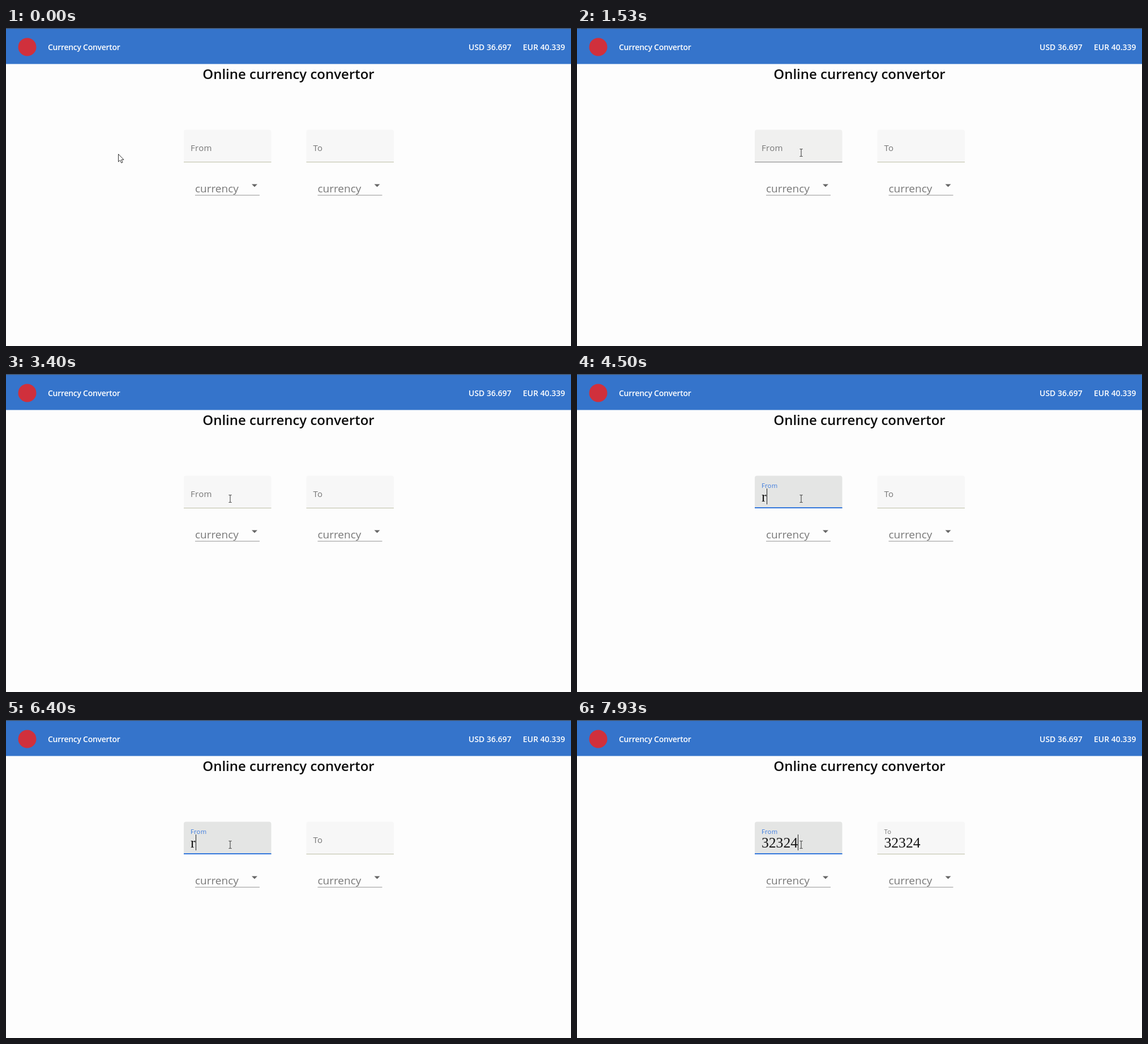
These frames come from a looping animation (998x561 px, 8000 ms). An HTML page:

```html
<!DOCTYPE html>
<html lang="en">
<head>
<meta charset="utf-8">
<title>Currency Convertor</title>
<style>
  html, body { margin: 0; width: 100%; height: 100%; overflow: hidden; background: #fdfdfd; }
  svg { display: block; width: 998px; height: 561px; }
  text { font-family: "Open Sans", "Noto Sans", sans-serif; white-space: pre; }
  .bar { font-size: 14px; font-weight: 600; fill: #fff; }
  .brand { letter-spacing: -0.28px; }
  .title { font-size: 24px; font-weight: 600; fill: #0b0b0b; text-anchor: middle; }
  .label { font-size: 15px; letter-spacing: 0.3px; }
  .value { font: 25.6px "Liberation Serif", "Times New Roman", serif; fill: #141414; }
  .select { font-size: 19px; fill: #787878; }
</style>
</head>
<body>
<svg viewBox="0 0 998 561" xmlns="http://www.w3.org/2000/svg">
  <rect width="998" height="561" fill="#fdfdfd"/>
  <rect width="998" height="63.5" fill="#3574cb"/>
  <rect width="998" height="1.3" fill="#48505a"/>
  <circle cx="37.5" cy="33.5" r="16" fill="#d0303c"/>
  <text class="bar brand" x="74" y="39">Currency Convertor</text>
  <text class="bar" x="817" y="39">USD 36.697</text>
  <text class="bar" x="913" y="39">EUR 40.339</text>
  <text class="title" x="499" y="90">Online currency convertor</text>
  <g id="fields"></g>
  <rect id="caret" y="202" width="1" height="28" fill="#222"/>
  <g id="pointer">
    <path id="arrow" d="M.5 .5V14L3.6 11.1 5.8 16 8 15 5.9 10.3H10Z" fill="#fff" stroke="#333" stroke-width="1"/>
    <path id="beam" d="M-2.5-6.5H-.8L0-6 .8-6.5H2.5M0-6V6M-2.5 6.5H-.8L0 6 .8 6.5H2.5" fill="none" stroke="#333" stroke-width="1"/>
  </g>
</svg>
<script>
const LOOP = 8000;
const BLINK = 530;
const HOVER_OFF = 2250;
const FOCUS = 3500;
const TO_FLOAT = 6985;

// [time, content of the From input]
const typing = [
  [FOCUS, ''], [4350, 'r'], [4900, 'rr'], [6250, 'r'], [6450, ''],
  [7060, '3'], [7200, '32'], [7340, '323'], [7480, '3232'], [7620, '32324']
];
const pointerPath = { start: 400, end: 1250, from: [198, 222], to: [396, 220] };

const $ = id => document.getElementById(id);
const set = (el, attrs) => {
  for (const name in attrs) el.setAttribute(name, attrs[name]);
};
const clamp = x => Math.min(1, Math.max(0, x));
const lerp = (a, b, p) => a + (b - a) * p;
const mix = (a, b, p) => `rgb(${a.map((v, i) => Math.round(lerp(v, b[i], p)))})`;
const smooth = p => p * p * (3 - 2 * p);

// cubic-bezier(.4, 0, .2, 1)
function standardEase(x) {
  if (x <= 0 || x >= 1) return clamp(x);
  let lo = 0, hi = 1, u;
  for (let i = 0; i < 20; i++) {
    u = (lo + hi) / 2;
    const bx = 1.2 * u * (1 - u) ** 2 + 0.6 * u * u * (1 - u) + u ** 3;
    if (bx < x) lo = u; else hi = u;
  }
  return u * u * (3 - 2 * u);
}
const progress = (t, start, length) => standardEase((t - start) / length);

function makeField(x, name) {
  const group = document.createElementNS('http://www.w3.org/2000/svg', 'g');
  group.setAttribute('transform', `translate(${x} 0)`);
  group.innerHTML = `
    <path class="box" d="M0 237V183.500a4 4 0 0 1 4-4H150.500a4 4 0 0 1 4 4V237Z" fill="#f7f7f7"/>
    <rect class="line" y="236" width="154.500" height="1" fill="#bdbea4"/>
    <rect class="ripple" y="235" height="2" fill="#3478dc"/>
    <text class="label" fill="#777">${name}</text>
    <text class="value" x="12" y="224.500"></text>
    <text class="select" x="20" y="290">currency</text>
    <rect x="20" y="294.500" width="114" height="1" fill="#929292"/>
    <path d="M120 275.500h10l-5 5Z" fill="#666"/>`;
  $('fields').append(group);
  const part = {};
  for (const key of ['box', 'line', 'ripple', 'label', 'value']) {
    part[key] = group.querySelector('.' + key);
  }
  return part;
}

const fromField = makeField(314, 'From');
const toField = makeField(530.5, 'To');

function floatLabel(field, p) {
  set(field.label, {
    transform: `translate(12 ${lerp(217, 201, p)}) scale(${lerp(1, 0.75, p)})`
  });
}

function drawPointer(t) {
  const { start, end, from, to } = pointerPath;
  const p = smooth(clamp((t - start) / (end - start)));
  const x = lerp(from[0], to[0], p), y = lerp(from[1], to[1], p);
  const inside = x > 314;
  set($('pointer'), { transform: `translate(${x} ${y})` });
  set($('arrow'), { visibility: inside ? 'hidden' : 'visible' });
  set($('beam'), { visibility: inside ? 'visible' : 'hidden' });
  return inside;
}

function draw(t) {
  const inside = drawPointer(t);
  const hover = inside && t < HOVER_OFF;
  const focus = progress(t, FOCUS, 150);
  const ripple = progress(t, FOCUS, 180);

  set(fromField.box, { fill: mix(hover ? [240, 240, 239] : [247, 247, 247], [228, 229, 228], clamp((t - FOCUS) / 15)) });
  set(fromField.line, { fill: hover ? '#808080' : '#bdbea4' });
  set(fromField.ripple, { x: 77.25 * (1 - ripple), width: 154.5 * ripple });
  set(fromField.label, { fill: mix([119, 119, 119], [58, 121, 222], focus) });
  floatLabel(fromField, focus);
  floatLabel(toField, progress(t, TO_FLOAT, 150));

  const last = typing.filter(([time]) => time <= t).pop();
  const content = last ? last[1] : '';
  fromField.value.textContent = content;
  toField.value.textContent = t > TO_FLOAT ? content : '';

  const caretOn = last && Math.floor((t - last[0]) / BLINK) % 2 === 0;
  const width = content ? fromField.value.getComputedTextLength() : 0;
  set($('caret'), { x: Math.round(326 + width), visibility: caretOn ? 'visible' : 'hidden' });
}

const origin = performance.now();
function tick() {
  draw((performance.now() - origin) % LOOP);
  requestAnimationFrame(tick);
}
tick();
</script>
</body>
</html>
```
